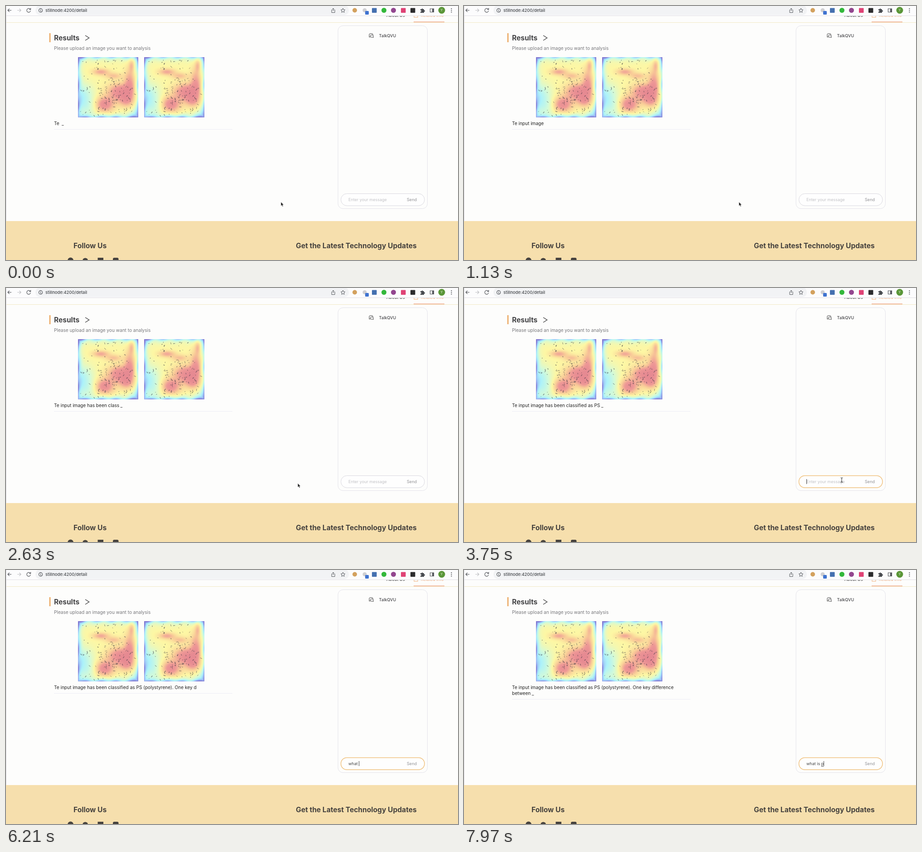
An HTML page with a canvas for the animation above (8 s loop, 998 by 561 pixels).

```html
<!DOCTYPE html>
<html lang="en">
<head>
<meta charset="utf-8">
<title>Results</title>
<style>
  html, body { margin: 0; width: 100%; height: 100%; overflow: hidden; background: #fdfdfc; }
  body { position: relative; font-family: Inter, "Open Sans", sans-serif; }
  svg, canvas, div { position: absolute; }
  svg { left: 0; top: 0; }
  #heat { left: 159px; top: 113px; }
  #result {
    left: 106px; top: 253px; width: 394px; padding-bottom: 6px;
    border-bottom: 1px solid #ededf5; font-size: 10.1px; line-height: 13px; color: #222;
  }
  #underscore { margin-left: 2.5px; }
  #entry { left: 756px; top: 421px; font-size: 9px; line-height: 13px; white-space: pre; color: #444; }
  #composing { text-decoration: underline; text-underline-offset: 2px; }
  #caret { display: inline-block; width: 1px; height: 11px; background: #444; vertical-align: -2px; margin-right: -1px; }
  #placeholder { left: 756px; top: 421px; font-size: 9px; line-height: 13px; color: #c2c2c6; }
</style>
</head>
<body>
<svg width="998" height="561" viewBox="0 0 998 561">
  <!-- site navigation, partly under the toolbar -->
  <text x="840" y="24" font-size="9.2" font-weight="500" fill="#444">About Us</text>
  <g fill="none" stroke="#f0b07c"><rect x="901" y="17" width="8" height="8"/><path d="M900 35.3h68" stroke="#efa98a" stroke-width="1.6"/></g>
  <text x="916" y="24" font-size="9" fill="#f0a978">Related Info</text>
  <path d="M0 36.5h998" stroke="#f3e9c4"/>

  <!-- browser toolbar -->
  <rect width="998" height="21" fill="#fcfcfd"/>
  <rect x="65" y="-1" width="692" height="21" rx="10" fill="#f2f3f5"/>
  <path d="M0 21.5h998M.5 0v561" stroke="#e0dfe5"/>
  <g fill="none" stroke="#55585d" stroke-width="1.2">
    <path d="M12 9.5H4M7.5 6 4 9.5 7.5 13"/>
    <path d="M25 9.5h8M29.5 6 33 9.5 29.5 13" stroke="#c0c1c4"/>
    <path d="M53.5 7.2A4.2 4.2 0 1 0 54.2 10.5M54.5 4.5v3.5H51"/>
    <circle cx="76.5" cy="9.7" r="4"/><path d="M76.5 9v3M76.5 7v1"/>
    <path d="M720.5 8.5h-1.5v6h7v-6h-1.5M722.5 11V5M720.5 7l2-2 2 2" stroke-width="1"/>
    <path d="M744 5l1.4 3.2 3.3.3-2.5 2.3.8 3.4-3-1.8-3 1.8.8-3.4-2.5-2.3 3.3-.3z" stroke-width="1"/>
    <path d="M936.5 6h8v7.5h-8z"/><path d="M942.5 6v7.5" stroke-width="3"/>
  </g>
  <text x="87" y="13" font-size="9.3" font-weight="500" fill="#44474b">stillnode:4200/detail</text>
  <circle cx="770" cy="9.5" r="5" fill="#d3a15e"/>
  <circle cx="792" cy="9.5" r="4.5" fill="#cfcfd2"/>
  <rect x="793" y="11" width="8" height="8" rx="1.5" fill="#3f73d0"/>
  <rect x="808" y="4.5" width="10.5" height="10.5" rx="1" fill="#4570b0"/>
  <circle cx="834.5" cy="9.5" r="5.5" fill="#33b83b"/>
  <circle cx="855.5" cy="9.5" r="5.5" fill="#93468f"/>
  <rect x="872" y="4.5" width="10.5" height="10.5" rx="1" fill="#df4275"/>
  <rect x="893" y="4.5" width="10.5" height="10.5" rx="1" fill="#2b2b2d"/>
  <path d="M915 7h2.500a1.600 1.600 0 1 1 3.200 0h2.300v2.500a1.600 1.600 0 1 1 0 3v2.500h-8v-2.500a1.600 1.600 0 1 0 0-3z" fill="#484b50"/>
  <circle cx="962" cy="9.5" r="7.5" fill="#5a9638"/>
  <text x="962" y="12" font-size="7" text-anchor="middle" fill="#e6f0dc">Y</text>
  <path d="M983.5 5v2m0 1.7v2m0 1.7v2" stroke="#55585d" stroke-width="1.8"/>

  <!-- headings -->
  <rect x="95.5" y="60" width="3" height="20" fill="#edb06f"/>
  <text x="106" y="76" font-size="15.5" font-weight="700" fill="#444446">Results</text>
  <path d="M175 65l8.5 5.5-8.5 5.5" fill="none" stroke="#444" stroke-width="1.4"/>
  <text x="106" y="97" font-size="10.1" fill="#77777b">Please upload an image you want to analysis</text>

  <!-- chat card -->
  <rect x="733" y="43.5" width="197.5" height="404" rx="11" fill="none" stroke="#e4e3ea"/>
  <g fill="#fdfdfd" stroke="#444"><path d="M803.5 61h4.5a2 2 0 0 1 2 2v3a2 2 0 0 1-2 2h-4l-2 1v-6a2 2 0 0 1 1.5-2z"/><path d="M806.5 64h2.5a2 2 0 0 1 2 2v4l-1.5-1h-3a2 2 0 0 1-2-2v-1a2 2 0 0 1 2-2z"/></g>
  <text x="823.5" y="68.5" font-size="9.1" font-weight="500" fill="#47474a">TalkQVU</text>
  <rect id="field" x="739.5" y="414.5" width="184.5" height="26.5" rx="13" fill="#fefefe"/>
  <text x="885" y="431" font-size="9.1" fill="#929296">Send</text>

  <!-- footer -->
  <rect y="475" width="998" height="86" fill="#f6dfad"/>
  <g font-size="15.6" font-weight="700" fill="#46423e">
    <text x="149" y="535">Follow Us</text>
    <text x="640" y="535">Get the Latest Technology Updates</text>
    <circle cx="142.5" cy="562" r="6.5"/><circle cx="175" cy="562.5" r="6"/>
    <rect x="202.5" y="556" width="12.5" height="12"/><rect x="236" y="556" width="12.5" height="12" rx="3"/>
  </g>
</svg>
<canvas id="heat" width="279" height="133"></canvas>
<div id="result"><span id="typed"></span><span id="underscore">_</span></div>
<div id="placeholder">Enter your message</div>
<div id="entry"><span id="committed"></span><span id="composing"></span><span id="caret"></span></div>
<svg width="998" height="561" viewBox="0 0 998 561">
  <g id="pointer">
    <path id="arrow" d="M0 0v8.5l2-1.8 1.5 3.2 1.5-.7-1.4-3.1h2.6z" fill="#222" stroke="#fff" stroke-width=".5"/>
    <path id="ibeam" d="M-2.5-5q2.5 0 2.5 1.5v7q0 1.5-2.5 1.5M2.5-5Q0-5 0-3.5v7Q0 5 2.5 5" fill="none" stroke="#333" stroke-width="1.1"/>
  </g>
</svg>
<script>
const LOOP = 8000;
const SENTENCE = 'Te input image has been classified as PS (polystyrene). One key difference between';
const FOCUS_AT = 3450, TYPING_AT = 4850;
// [start time, committed text, text still being composed]
const ENTRY = [
  [0, '', ''], [TYPING_AT, '', 'w'], [5200, '', 'w h'], [5550, '', 'w h a'], [5750, '', 'w h a t'],
  [5950, 'what', ''], [6100, 'what ', ''], [6750, 'what ', 'i'], [7000, 'what ', 'i s'],
  [7250, 'what is', ''], [7400, 'what is ', ''], [7800, 'what is ', 'p']
];
const el = id => document.getElementById(id);
const show = (id, on) => { el(id).style.visibility = on ? 'visible' : 'hidden'; };

function seeded(seed) {
  return () => (seed = (seed * 16807) % 2147483647) / 2147483647;
}

// Heat from cold to hot, evenly spaced
const RAMP = [[125, 115, 208], [155, 190, 246], [172, 242, 250], [212, 250, 215],
              [253, 247, 164], [249, 206, 152], [238, 152, 150], [230, 138, 146]];
// x, y, x radius, y radius, strength
const BLOBS = [
  [93, 76, 27, 18, .38], [58, 104, 21, 17, .36], [114, 55, 12, 30, .26], [106, 95, 16, 15, .24],
  [118, 18, 6, 14, .16], [50, 32, 18, 7, .24], [78, 41, 18, 7, .17],
  [8, 80, 24, 24, -.2], [16, 108, 24, 22, -.17], [0, 132, 13, 10, -.2], [0, 0, 14, 12, -.25],
  [132, 132, 18, 15, -.3], [132, 0, 9, 9, -.28], [65, 133, 30, 7, -.12], [1, 38, 6, 26, -.1]
];

function heatAt(x, y) {
  const edge = Math.min(x, y, 132 - x, 132 - y);
  const ripple = 1 + .3 * Math.sin(x * .19 + y * .13);
  let heat = .57 - .33 * ripple * Math.exp(-edge / 4.5);
  for (const [bx, by, rx, ry, k] of BLOBS)
    heat += k * Math.exp(-(((x - bx) / rx) ** 2) - ((y - by) / ry) ** 2);
  return Math.max(0, Math.min(.999, heat));
}

function drawHeatmap() {
  const ctx = el('heat').getContext('2d');
  const size = 133, image = ctx.createImageData(size, size);
  for (let i = 0; i < size * size; i++) {
    const pos = heatAt(i % size, Math.floor(i / size)) * (RAMP.length - 1);
    const low = Math.floor(pos), mix = pos - low;
    for (let c = 0; c < 3; c++)
      image.data[i * 4 + c] = RAMP[low][c] * (1 - mix) + RAMP[low + 1][c] * mix;
    image.data[i * 4 + 3] = 255;
  }
  ctx.putImageData(image, 0, 0);

  const random = seeded(4127);
  ctx.strokeStyle = 'rgba(45, 45, 60, .65)';
  for (let i = 0; i < 155; i++) {
    const central = i < 80;
    const x = central ? 42 + random() * 78 : 3 + random() * 126;
    const y = central ? 45 + random() * 78 : 2 + random() * 126;
    const angle = random() * Math.PI, length = 1.5 + random() * 3.5;
    ctx.lineWidth = .7 + random() * .6;
    ctx.beginPath();
    ctx.moveTo(x, y);
    ctx.lineTo(x + Math.cos(angle) * length, y + Math.sin(angle) * length);
    ctx.stroke();
  }
  ctx.drawImage(el('heat'), 0, 0, size, size, 146, 0, size, size);
}

function render(t) {
  el('typed').textContent = SENTENCE.slice(0, 3 + Math.floor((t + 25) / 100));
  show('underscore', (t + 400) % 1000 < 500);

  const [, committed, composing] = ENTRY.filter(step => step[0] <= t).pop();
  const focused = t >= FOCUS_AT;
  el('committed').textContent = committed;
  el('composing').textContent = composing;
  show('placeholder', !committed && !composing);
  show('caret', focused && (t >= TYPING_AT || (t - FOCUS_AT) % 1000 < 500));
  el('field').setAttribute('stroke', focused ? '#f0c27f' : '#d9d8df');
  el('field').setAttribute('stroke-width', focused ? 1.5 : 1);

  const p = Math.max(0, Math.min(1, (t - 2400) / 900));
  const ease = p * p * (3 - 2 * p);
  const x = 607 + 227 * ease, y = 433 - 9 * ease;
  const overField = x > 740;
  el('pointer').setAttribute('transform', `translate(${x} ${y})`);
  show('arrow', t < TYPING_AT && !overField);
  show('ibeam', t < TYPING_AT && overField);
}

function tick() {
  render(performance.now() % LOOP);
  requestAnimationFrame(tick);
}
drawHeatmap();
tick();
</script>
</body>
</html>
```
